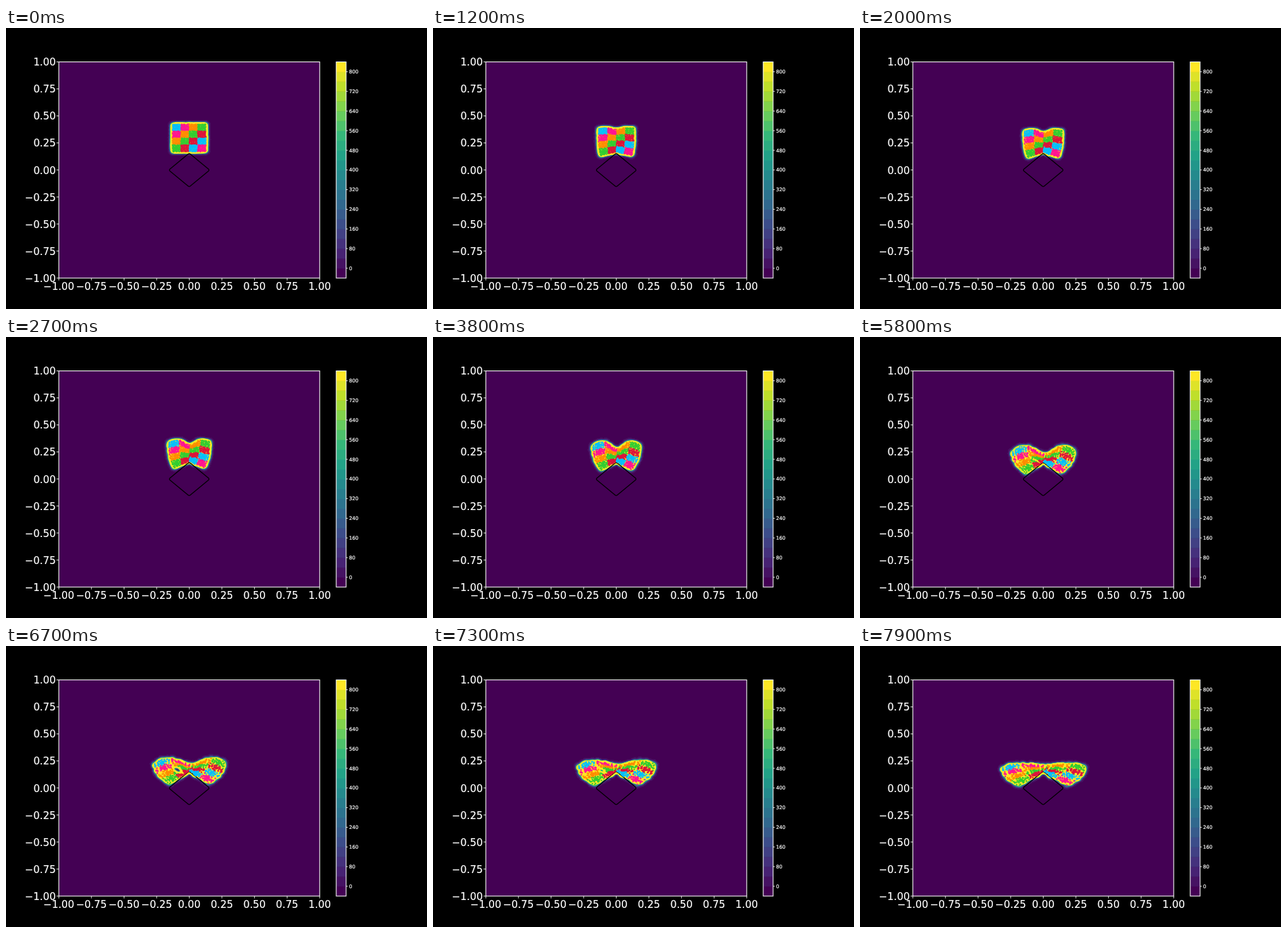
Animation of 640 by 427 pixels, one loop 8 s. Source, as an HTML page with a canvas:

```html
<!DOCTYPE html>
<html lang="en">
<head>
<meta charset="utf-8">
<title>Fluid block on a wedge</title>
<style>
  html, body { margin: 0; width: 100%; height: 100%; overflow: hidden; background: #000; }
  svg, canvas { position: absolute; left: 0; top: 0; width: 640px; height: 427px; }
  text {
    fill: #fff; stroke: #fff; stroke-width: 0.2px;
    font-family: "DejaVu Sans", Verdana, sans-serif;
  }
</style>
</head>
<body>
<svg id="plot" viewBox="0 0 640 427"></svg>
<canvas id="fluid" width="640" height="427"></canvas>
<script>
const LOOP = 8000, STEP = 100;
const AXES = { l: 80.3, r: 476.9, t: 51.5, b: 380 };
const BANDS = 22;

// ---- colour map ----
const STOPS = ['440154', '482878', '3e4989', '31688e', '26828e',
  '1f9e89', '35b779', '6ece58', 'b5de2b', 'fde725']
  .map(h => [0, 2, 4].map(i => parseInt(h.slice(i, i + 2), 16)));

function viridis(f) {
  const s = f * (STOPS.length - 1), i = Math.min(STOPS.length - 2, Math.floor(s));
  return STOPS[i].map((c, k) => Math.round(c + (STOPS[i + 1][k] - c) * (s - i)));
}
const bandColors = Array.from({ length: BANDS }, (_, i) => viridis(i / (BANDS - 1)));
const rgb = c => `rgb(${c})`;

// ---- static chart ----
const plot = document.getElementById('plot');

function add(tag, attrs, label) {
  const el = document.createElementNS('http://www.w3.org/2000/svg', tag);
  for (const k in attrs) el.setAttribute(k, attrs[k]);
  if (label !== undefined) el.textContent = label;
  plot.appendChild(el);
}
const tick = d => add('path', { d, stroke: '#fff', 'stroke-width': 0.9 });
const frame = (x, y, width, height) =>
  add('rect', { x, y, width, height, fill: 'none', stroke: '#fff', 'stroke-width': 1.1 });

function drawChart() {
  const { l, r, t, b } = AXES, w = r - l, h = b - t;
  add('rect', { x: l, y: t, width: w, height: h, fill: rgb(bandColors[0]) });
  for (let i = 0; i <= 8; i++) {
    const v = -1 + i / 4, x = l + w * i / 8, y = b - h * i / 8;
    const label = v.toFixed(2).replace('-', '\u2212');
    tick(`M${x} ${b}v3.5`);
    tick(`M${l} ${y}h-3.5`);
    add('text', { x, y: 397.9, 'font-size': 15.3, 'text-anchor': 'middle' }, label);
    add('text', { x: 75.7, y: y + 5.8, 'font-size': 15.3, 'text-anchor': 'end' }, label);
  }
  frame(l, t, w, h);

  const bh = h / BANDS;
  bandColors.forEach((c, i) => add('rect', {
    x: 502, y: b - (i + 1) * bh, width: 15, height: bh + (i ? 0.5 : 0), fill: rgb(c)
  }));
  for (let v = 0; v <= 800; v += 80) {
    const y = b - (v / 40 + 1) * bh;
    tick(`M517 ${y}h2.6`);
    add('text', { x: 521.5, y: y + 2.7, 'font-size': 7.5 }, v);
  }
  frame(502, t, 15, h);
}

// ---- fluid shape: s runs from -1 (left) to 1 (right), k is the loop progress ----
const BLOCK = { x: 278.5, half: 25.5, top: 146, bottom: 188 };
const { PI, sin, cos, abs, exp } = Math;

// the surface sags in the middle, leaving a shoulder on each side
function upperEdge(s, k) {
  const wide = k ** 1.75;
  const x = BLOCK.x + 4 * k * (1 - s * s) +
    s * (BLOCK.half + 39.3 * wide) + 7.4 * wide * sin(PI * s);
  const corner = 40 * k;
  const shoulder = 34 * k - 3.5 * sin(PI * k) + 2.5 * sin(2 * PI * k);
  const middle = 36 * sin(PI * k / 2);
  const d = abs(s);
  const drop = d < 0.5
    ? shoulder + (middle - shoulder) * (1 + cos(2 * PI * d)) / 2
    : shoulder + (corner - shoulder) * (2 * d - 1) ** 2;
  return [x, BLOCK.top + drop];
}

// the underside rests on the tip and slides down both slopes
function lowerEdge(s, k) {
  const half = BLOCK.half + 13 * k ** 4 - 2.5 * sin(PI * k);
  const middle = 3 * k, corner = 25 * k ** 0.75;
  return [BLOCK.x + s * half, BLOCK.bottom + middle + (corner - middle) * abs(s)];
}

// ---- particles ----
const COLORS = ['#00bfff', '#ff1493', '#ff8c00', '#32cd32', '#dc143c'];
const NX = 8, NY = 7;
let seed = 11;
function rand() {
  seed = (seed + 0x6d2b79f5) | 0;
  let z = Math.imul(seed ^ (seed >>> 15), 1 | seed);
  z = (z + Math.imul(z ^ (z >>> 7), 61 | z)) ^ z;
  return ((z ^ (z >>> 14)) >>> 0) / 4294967296;
}
const particles = [];
for (let row = 0; row < 4; row++)
  for (let col = 0; col < 4; col++)
    for (let n = 0; n < NX * NY; n++)
      particles.push({
        row, col,
        a: (n % NX + 0.5) / NX,
        b: (Math.floor(n / NX) + 0.5) / NY,
        jx: rand() * 2 - 1, jy: rand() * 2 - 1, phase: rand() * 2 * PI,
        color: COLORS[(row + col) % 5]
      });

const WEDGE = { x: 278.5, y: 215.9, rx: 31, ry: 25.7 };

// a slanted slot opens left of the tip late in the loop
function openSlot(x, y, k) {
  const dx = x - 262 + 66 * (k - 0.84), dy = y - 188.5;
  const along = 0.82 * dx + 0.57 * dy, across = 0.82 * dy - 0.57 * dx;
  const gap = 5.5 * exp(-(((k - 0.84) / 0.11) ** 2) - (along / 8) ** 2);
  const push = Math.sign(across) * gap * Math.max(0, 1 - abs(across) / 12);
  return [x - 0.57 * push, y + 0.82 * push];
}

function place(p, k) {
  // each patch clumps towards its own centre
  const clump = q => q + 0.12 * k * sin(2 * PI * q);
  const s = (p.col + clump(p.a)) / 2 - 1, v = (p.row + clump(p.b)) / 4;
  const [x0, y0] = upperEdge(s, k), [x1, y1] = lowerEdge(s, k);
  const bow = 8 * k * s ** 3 * 4 * v * (1 - v);
  const spread = 0.55 + 0.9 * k, turn = 0.4 * k * sin(p.phase + 9 * k);
  let [x, y] = openSlot(
    x0 + (x1 - x0) * v + bow + p.jx * spread + turn,
    y0 + (y1 - y0) * v + p.jy * spread - turn, k);

  // keep clear of the wedge
  const side = abs(x - WEDGE.x) / WEDGE.rx;
  if (side < 1.05) y = Math.min(y, WEDGE.y - WEDGE.ry * (1.05 - side));
  return [x, y];
}

// ---- density field ----
const BOX = { x: 195, y: 125, w: 170, h: 105 };
const HX = 7.8, HY = 6.5, GAIN = 400;
const ctx = document.getElementById('fluid').getContext('2d');
const image = ctx.createImageData(BOX.w, BOX.h);
const density = new Float32Array(BOX.w * BOX.h);

function splat(x, y) {
  const cx = x - BOX.x - 0.5, cy = y - BOX.y - 0.5;
  for (let j = Math.ceil(cy - HY); j <= cy + HY; j++)
    for (let i = Math.ceil(cx - HX); i <= cx + HX; i++) {
      if (i < 0 || j < 0 || i >= BOX.w || j >= BOX.h) continue;
      const q = 1 - ((i - cx) / HX) ** 2 - ((j - cy) / HY) ** 2;
      if (q > 0) density[j * BOX.w + i] += GAIN * q ** 3;
    }
}

function drawField(points) {
  density.fill(0);
  points.forEach(([x, y]) => splat(x, y));
  density.forEach((value, i) => {
    const band = Math.min(BANDS - 1, Math.ceil(value / 40));
    image.data.set(bandColors[band], i * 4);
    image.data[i * 4 + 3] = band ? 255 : 0;
  });
  ctx.putImageData(image, BOX.x, BOX.y);
}

function drawWedge() {
  const { x, y, rx, ry } = WEDGE, c = 0.06;
  const corner = i => [x + rx * sin(i * PI / 2), y - ry * cos(i * PI / 2)];
  const mix = ([ax, ay], [bx, by]) => [ax + (bx - ax) * c, ay + (by - ay) * c];
  ctx.beginPath();
  for (let i = 0; i < 4; i++) {
    const tip = corner(i);
    ctx.lineTo(...mix(tip, corner(i - 1)));
    ctx.quadraticCurveTo(...tip, ...mix(tip, corner(i + 1)));
  }
  ctx.closePath();
  ctx.strokeStyle = '#000';
  ctx.lineWidth = 1.3;
  ctx.stroke();
}

function draw(t) {
  const points = particles.map(p => place(p, t / LOOP));
  ctx.clearRect(0, 0, 640, 427);
  drawField(points);
  drawWedge();
  points.forEach(([x, y], i) => {
    ctx.fillStyle = particles[i].color;
    ctx.beginPath();
    ctx.arc(x, y, 1.2, 0, 2 * PI);
    ctx.fill();
  });
}

drawChart();
const start = performance.now();
let shown = -1;
function tickFrame() {
  const t = Math.floor((performance.now() - start) % LOOP / STEP) * STEP;
  if (t !== shown) draw(shown = t);
  requestAnimationFrame(tickFrame);
}
tickFrame();
</script>
</body>
</html>
```
